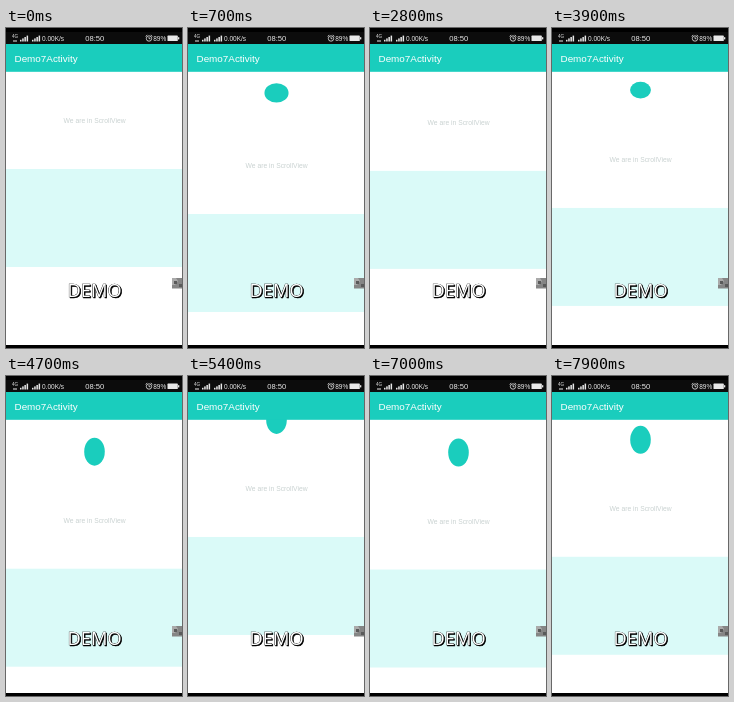
These frames come from a looping animation (176 px wide and 320 px high, 8 s). An HTML page:

```html
<!DOCTYPE html>
<html lang="en">
<head>
<meta charset="utf-8">
<title>Pull to refresh</title>
<style>
  html, body { margin: 0; width: 100%; height: 100%; overflow: hidden; background: #fff; }
  svg { display: block; width: 176px; height: 320px; font-family: "Liberation Sans", Arial, sans-serif; }
  .demo { font: 18.2px "Open Sans", "Noto Sans", sans-serif; }
</style>
</head>
<body>
<svg viewBox="0 0 176 320">
  <rect width="176" height="320" fill="#fff"/>

  <ellipse id="ball" cx="88.5" fill="#1acdbd"/>
  <g id="page">
    <text x="57.5" y="95.4" font-size="6.75" fill="#c9d2d1">We are in ScrollView</text>
    <rect y="141" width="176" height="98" fill="#dafaf8"/>
  </g>

  <rect y="16" width="176" height="27.8" fill="#1acdbd"/>
  <text x="8.5" y="33.8" font-size="9.9" fill="#fff">Demo7Activity</text>

  <rect width="176" height="16" fill="#0c0c0c"/>
  <rect width="176" height="4" fill="#000"/>
  <g fill="#e8e8e8">
    <text x="6" y="10.4" font-size="4.6">4G</text>
    <path d="M7 12.5h4v1h-4z"/>
    <g id="bars"></g>
    <text x="36" y="12.6" font-size="6.5">0.00K/s</text>
    <text x="79.2" y="13.1" font-size="7.6">08:50</text>
    <text x="147.2" y="12.7" font-size="6.5">89%</text>
    <rect x="161.5" y="7.6" width="10.3" height="5.4" rx=".6"/>
    <rect x="172" y="9.2" width="1.3" height="2.2"/>
  </g>
  <g fill="none" stroke="#e8e8e8" stroke-width=".8">
    <circle cx="143" cy="10.5" r="2.7"/>
    <path d="M143 9v1.7h1.4M139.6 8.4l1.6-1.3M146.4 8.4l-1.6-1.3"/>
  </g>

  <rect y="317" width="176" height="3" fill="#000"/>

  <g>
    <rect x="166" y="250" width="10" height="10.5" fill="#858585"/>
    <path d="M166 250h4l2 3-3 4h-3z" fill="#aaa"/>
    <path d="M168 253h3v3h-3zM173 256h3v3h-3z" fill="#5a5a5a"/>
  </g>

  <g class="demo">
    <text x="62.6" y="269.6" fill="#000" stroke="#000" stroke-width=".7">DEMO</text>
    <text x="61.6" y="268.6" fill="#fff" stroke="#000" stroke-width=".7" paint-order="stroke">DEMO</text>
  </g>
</svg>
<script>
const LOOP = 8000, STEP = 100, REST = 51.7;

// each drag: when it starts, how far it goes, how it slows (lower = faster start)
const DRAGS = [
  { start: 0, peak: 59, power: .6 },
  { start: 3200, peak: 52, power: .64 },
  { start: 6100, peak: 56, power: .32 }
];
const GROWN = 900, RELEASE = 1100, SETTLED = 1300, CLOSE = 1600, CLOSED = 3000;

const page = document.getElementById("page");
const ball = document.getElementById("ball");

const bars = [14, 26].flatMap(x => [0, 1, 2, 3].map(i =>
  `<rect x="${x + i * 2.2}" y="${11.8 - i * 1.4}" width="1.5" height="${1.7 + i * 1.4}"/>`));
document.getElementById("bars").innerHTML = bars.join("");

const part = (u, from, to) => Math.min(1, Math.max(0, (u - from) / (to - from)));

function pullAt(u, { peak, power }) {
  if (u < RELEASE) return peak * part(u, 0, RELEASE) ** power;
  if (u < CLOSE) return peak + (REST - peak) * part(u, RELEASE, SETTLED);
  return REST * (1 - part(u, CLOSE, CLOSED)) ** 1.7;
}

function setBall(cy, rx, ry) {
  ball.setAttribute("cy", cy);
  ball.setAttribute("rx", rx);
  ball.setAttribute("ry", ry);
}

function draw(t) {
  const drag = DRAGS.findLast(g => t >= g.start);
  const u = t - drag.start;
  const d = pullAt(u, drag);
  page.setAttribute("transform", `translate(0 ${d.toFixed(2)})`);
  if (u >= GROWN) setBall(24 + d, 10.3, 14);
  else setBall(44 + d * .465, d * .268, d * .215);
}

const start = performance.now();
function tick() {
  const t = (performance.now() - start) % LOOP;
  draw(Math.floor(t / STEP) * STEP);
  requestAnimationFrame(tick);
}
tick();
</script>
</body>
</html>
```
